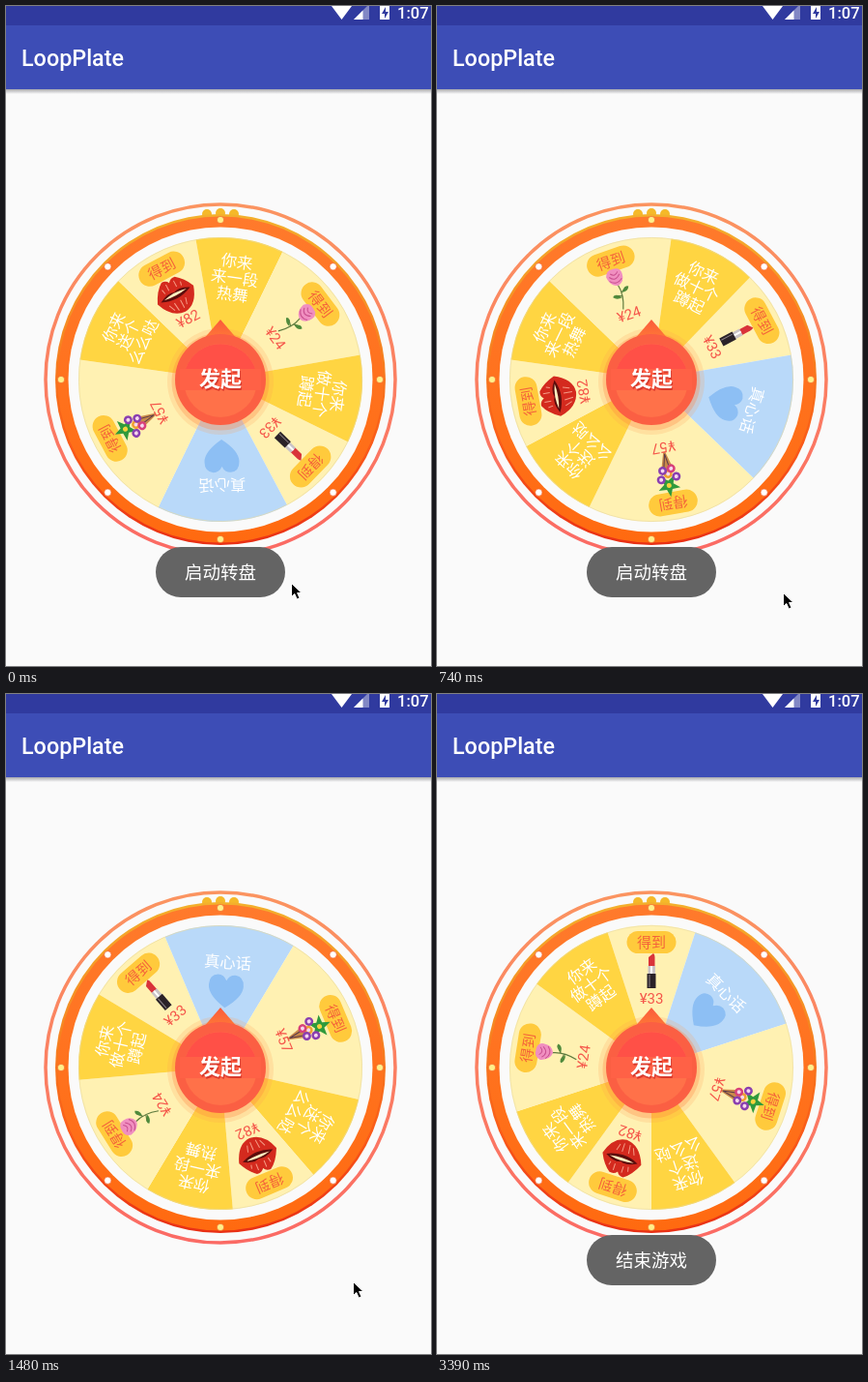
An HTML page for the animation above (3.85 s loop, 440 by 682 pixels).

```html
<!DOCTYPE html>
<html lang="zh">
<head>
<meta charset="utf-8">
<title>LoopPlate</title>
<style>
  html, body { margin: 0; width: 100%; height: 100%; overflow: hidden; background: #fafafa; }
  svg { display: block; width: 440px; height: 682px; }
  text { font-family: "Noto Sans CJK SC", "Noto Sans CJK", sans-serif; }
  .mid { text-anchor: middle; }
  .bar { font-family: Roboto, sans-serif; font-weight: 500; fill: #fff; }
  .price { font-family: Roboto, "Noto Sans CJK SC", sans-serif; font-size: 15px; fill: #f5564a; }
</style>
</head>
<body>
<svg viewBox="0 0 440 682">
  <defs>
    <linearGradient id="rim" x2="0" y2="1">
      <stop stop-color="#fb9460"/><stop offset="1" stop-color="#fb6a64"/>
    </linearGradient>
    <linearGradient id="edge" x2="0" y2="1">
      <stop stop-color="#f3b02c"/><stop offset=".35" stop-color="#f58a22"/>
      <stop offset=".7" stop-color="#fa5a18"/><stop offset="1" stop-color="#e92f14"/>
    </linearGradient>
    <linearGradient id="band" x2="0" y2="1">
      <stop stop-color="#ff7a2c"/><stop offset="1" stop-color="#ff6a10"/>
    </linearGradient>
    <linearGradient id="shade" x2="0" y2="1">
      <stop stop-color="#a9a9ad"/><stop offset="1" stop-color="#fafafa"/>
    </linearGradient>
    <linearGradient id="tip" x2="0" y2="1">
      <stop stop-color="#fb5a3c"/><stop offset="1" stop-color="#ff7d35"/>
    </linearGradient>
  </defs>

  <rect width="440" height="682" fill="#fafafa"/>
  <rect y="86" width="440" height="5" fill="url(#shade)"/>
  <rect y="20" width="440" height="66" fill="#3d4db6"/>
  <rect width="440" height="20" fill="#303a9f"/>
  <text class="bar" x="16" y="62" font-size="23.3">LoopPlate</text>
  <g fill="#fff">
    <path d="M337 0H358L347.500 14Z"/>
    <path d="M376 -2V14H360Z" opacity=".4"/>
    <path d="M369.500 4.500V14H360Z"/>
    <path d="M387 0H397V14H387Z"/>
  </g>
  <path d="M393 1L389 8H392V13L396 6H393Z" fill="#303a9f"/>
  <text class="bar" x="405" y="13" font-size="16.5">1:07</text>

  <circle cx="222" cy="386" r="181" fill="none" stroke="url(#rim)" stroke-width="3.500"/>
  <g fill="#f5b929">
    <circle cx="208" cy="215" r="5"/><circle cx="222" cy="214" r="5"/><circle cx="236" cy="215" r="5"/>
  </g>
  <circle cx="222" cy="386" r="171" fill="url(#edge)"/>
  <circle cx="222" cy="386" r="168.500" fill="url(#band)"/>
  <circle cx="222" cy="386" r="157.500" fill="#fafafa"/>
  <g id="lamps"></g>

  <g id="wheel"></g>

  <circle cx="222" cy="388" r="55" fill="#ff9a50" opacity=".2"/>
  <circle cx="222" cy="388" r="50.500" fill="#ff8040" opacity=".3"/>
  <path d="M222 324L241 346H203Z" fill="url(#tip)"/>
  <circle cx="222" cy="386" r="47" fill="#fb5f43"/>
  <circle cx="222" cy="387" r="38" fill="#ff7149"/>
  <path d="M186 375A38 38 0 0 1 258 375Z" fill="#ff5047"/>
  <path d="M180 375H264V397H180Z" fill="#ff6146"/>
  <text class="mid" x="223" y="394.500" font-size="22" font-weight="900" fill="#d93a2c">发起</text>
  <text class="mid" x="222" y="393" font-size="22" font-weight="900" fill="#fff">发起</text>

  <g id="toast">
    <rect x="155" y="559" width="134" height="52" rx="26" fill="#646464"/>
    <text id="msg" class="mid" x="222" y="592" font-size="18.5" fill="#fff"></text>
  </g>
  <path id="cursor" d="M.5 .5V14.500L3.800 11.500L6.200 17L9 15.800L6.600 10.500H11Z" fill="#000" stroke="#fff"/>
</svg>

<script>
const $ = id => document.getElementById(id);
const polar = (deg, r) => {
  const a = deg * Math.PI / 180;
  return [r * Math.sin(a), -r * Math.cos(a)].map(v => v.toFixed(2));
};

// Drawings, with the hub at 0,0 and the rim upwards
const lipstick = `
  <path d="M-3 -104V-114L2 -118Q3.500 -117 3.500 -114V-104Z" fill="#d9333a"/>
  <path d="M-3.500 -105H4V-96H-3.500Z" fill="#c9c3c6"/><path d="M-1 -105H1V-96H-1Z" fill="#fff"/>
  <path d="M-4.500 -97H4.500V-82H-4.500Z" fill="#2a2228"/><path d="M-2 -96V-83" stroke="#8b8288"/>`;

const rose = `
  <path d="M-1 -104Q2 -92 -4 -78M0 -95L6 -99M0 -91L-7 -94" fill="none" stroke="#5d7a3e" stroke-width="1.2"/>
  <path d="M1 -95Q5 -102 9 -99Q7 -94 1 -95M-1 -90Q-8 -97 -10 -93Q-7 -89 -1 -90" fill="#4f8a3c"/>
  <path d="M-10 -115Q-8 -122 -1 -121Q7 -121 7 -114Q7 -105 -1 -103Q-9 -105 -10 -115Z" fill="#f08fc0"/>
  <path d="M-7 -114Q-2 -107 4 -114M-5 -117Q-1 -112 3 -117M-8 -110Q-2 -103 5 -109" fill="none" stroke="#c9508f"/>`;

const star = Array.from({ length: 10 }, (_, i) => polar(i * 36, i % 2 ? 5 : 12)).join(" ");
const balls = [[-8, -103, "#8a3fb0"], [8, -104, "#8a3fb0"], [0, -99, "#f0a030"], [-4, -94, "#d8407a"], [5, -95, "#8a3fb0"]]
  .map(([x, y, c]) => `<circle cx="${x}" cy="${y}" r="4.500" fill="${c}"/><circle cx="${x}" cy="${y}" r="2" fill="#f6d6ee"/>`).join("");
const bouquet = `
  <path d="M-7 -97H7L1 -76H-1Z" fill="#c98a4a"/><path d="M-3 -96L0 -78L4 -96" fill="none" stroke="#5a3a4a"/>
  <polygon points="${star}" transform="translate(1 -111)" fill="#2f9a3c"/>${balls}
  <circle cx="1" cy="-111" r="2.500" fill="#f5d23c"/>`;

const lips = `
  <path d="M-21 -99Q-15 -112 -7 -117Q-2 -117 0 -113Q3 -117 8 -116Q16 -110 21 -99Q15 -80 1 -79Q-14 -80 -21 -99Z" fill="#d42a1e"/>
  <path d="M-17 -99Q-6 -105 0 -102Q7 -105 17 -99Q8 -95 0 -95Q-9 -95 -17 -99Z" fill="#5c0d0d"/>
  <path d="M-13 -99.500Q0 -103 13 -99.500Q0 -97 -13 -99.500Z" fill="#fff0c0"/>
  <path d="M-11 -92L-8 -85M-5 -92L-4 -83M2 -92V-83M8 -92L6 -85M-10 -110L-9 -105M-4 -113V-106M5 -113V-106M11 -109L10 -105" stroke="#f59a85"/>`;

const dare = (...lines) => lines.map((s, i) =>
  `<text class="mid" y="${-117 + 17 * i}" font-size="16.4" fill="#fff">${s}</text>`).join("");
const prize = (art, cost) => `
  <rect x="-25.500" y="-141" width="51" height="23" rx="11.500" fill="#ffca3c"/>
  <text class="mid" y="-124" font-size="15" fill="#f4623a">得到</text>
  ${art}<text class="mid price" y="-66">¥${cost}</text>`;
const truth = `
  <text class="mid" y="-103" font-size="16.4" fill="#fff">真心话</text>
  <path d="M0 -62Q-18 -74 -18 -85Q-18 -95 -9 -96Q-3 -96 0 -90Q3 -96 9 -96Q18 -95 18 -85Q18 -74 0 -62Z" fill="#8dbff4"/>`;

const GOLD = "#ffd542", CREAM = "#fff1b2", BLUE = "#b9d9f9";
const sectors = [
  [36, CREAM, prize(lipstick, 33)],
  [54, BLUE, truth],
  [72, CREAM, prize(bouquet, 57)],
  [36, GOLD, dare("你来", "送个", "么么哒")],
  [36, CREAM, prize(lips, 82)],
  [36, GOLD, dare("你来", "来一段", "热舞")],
  [54, CREAM, prize(rose, 24)],
  [36, GOLD, dare("你来", "做十个", "蹲起")],
];

let from = -18;
$("wheel").innerHTML = sectors.map(([span, color, content]) => {
  const to = from + span, mid = from + span / 2;
  const wedge = `M0 0L${polar(from, 147)}A147 147 0 0 1 ${polar(to, 147)}Z`;
  from = to;
  return `<path d="${wedge}" fill="${color}"/><g transform="rotate(${mid})">${content}</g>`;
}).join("") + `<circle r="146.600" fill="none" stroke="#e8d9a0" stroke-width=".8" opacity=".7"/>`;

$("lamps").innerHTML = Array.from({ length: 8 }, (_, i) => {
  const [x, y] = polar(i * 45, 165);
  return `<circle cx="${x}" cy="${y}" r="3.600" transform="translate(222 386)" fill="${i % 2 ? "#fff" : "#fff08a"}" stroke="#f0602a" stroke-width=".6"/>`;
}).join("");

// Motion
const LOOP = 3850;
const ticks = [0, 140, 290, 440, 590, 740, 890, 1040, 1180, 1330, 1480, 1620, 1770,
  1920, 2060, 2210, 2360, 2650, 2800, 2950, 3090, 3240, 3390];
// time, degrees left to turn
const spin = [[0, 1666], [290, 1228.6], [740, 658], [1040, 392.3], [1480, 41], [1770, 0]];
// time, pointer tip
const track = [[0, 295, 596], [140, 330, 609], [290, 342, 605], [440, 352, 605], [590, 357, 604],
  [740, 358, 606], [890, 359, 607], [1770, 358, 607], [2650, 352, 601], [2800, 341, 590],
  [2950, 286, 527], [3090, 271, 500], [3240, 398, 671], [3390, 500, 700]];

const clamp = v => Math.min(1, Math.max(0, v));

function slope(i) {
  if (i === 0) return -1.5;
  if (i === spin.length - 1) return 0;
  const [a, b] = [spin[i - 1], spin[i + 1]];
  return (b[1] - a[1]) / (b[0] - a[0]);
}

function turnLeft(t) {
  const i = spin.findIndex(k => k[0] > t) - 1;
  if (i < 0) return 0;
  const [t0, a] = spin[i], [t1, b] = spin[i + 1];
  const d = t1 - t0, s = (t - t0) / d, q = 1 - s;
  return (1 + 2 * s) * q * q * a + s * s * (3 - 2 * s) * b
    + d * s * q * (q * slope(i) - s * slope(i + 1));
}

function draw(now) {
  const t = ticks.findLast(k => k <= now % LOOP);
  $("wheel").setAttribute("transform", `translate(222 386) rotate(${-turnLeft(t)})`);

  const ending = t > 1500;
  $("msg").textContent = ending ? "结束游戏" : "启动转盘";
  $("toast").setAttribute("opacity", ending ? clamp((t - 1700) / 600) : 1 - clamp((t - 790) / 500) ** 2);

  const [, x, y] = track.findLast(k => k[0] <= t);
  $("cursor").setAttribute("transform", `translate(${x} ${y})`);
}

const start = performance.now();
function frame() {
  draw(performance.now() - start);
  requestAnimationFrame(frame);
}
frame();
</script>
</body>
</html>
```
